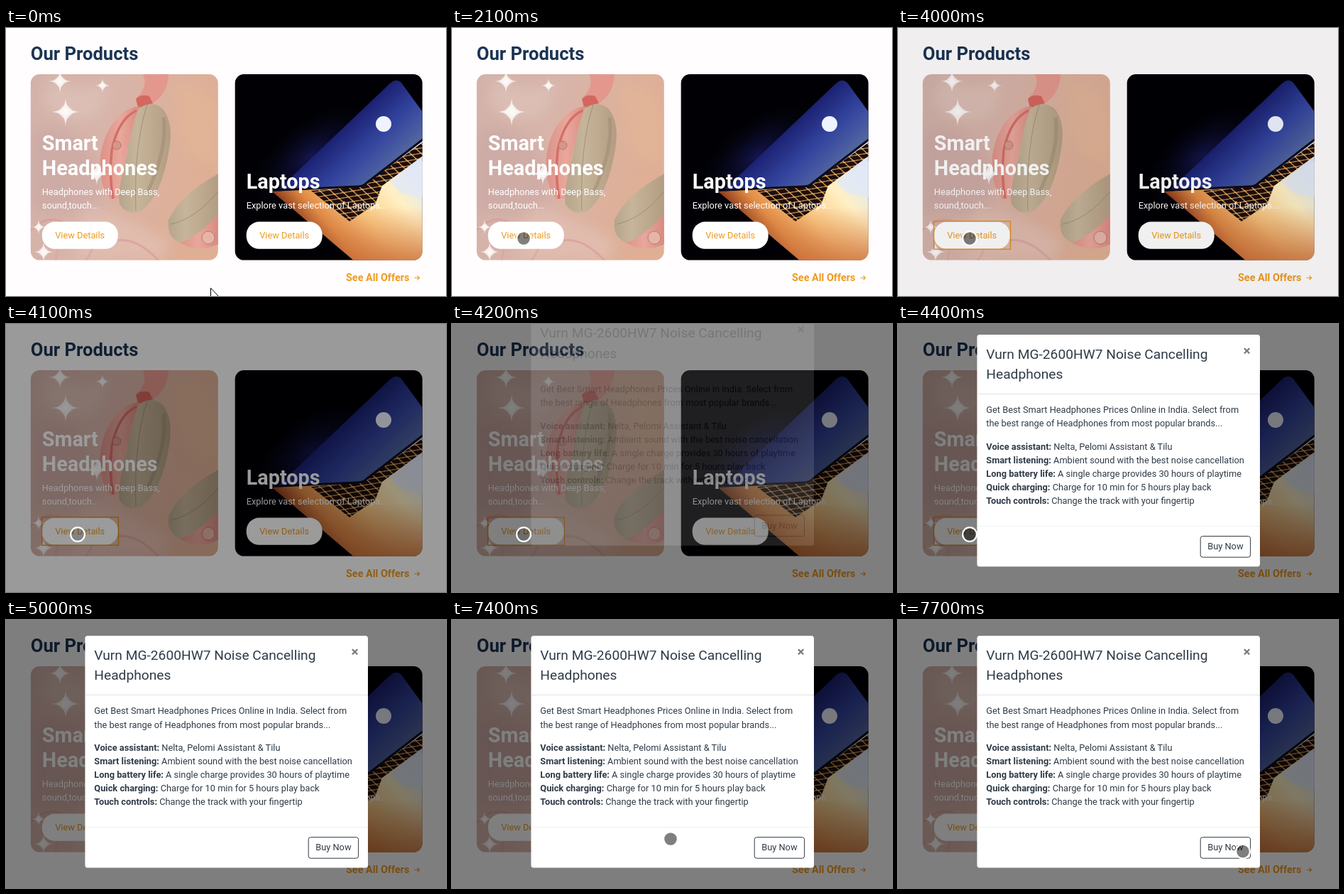
Recreate the animation shown at these times as an HTML page. Size 620x377 px, loop 8 s.

```html
<!DOCTYPE html>
<html lang="en">
<head>
<meta charset="utf-8">
<title>Our Products</title>
<style>
  html, body { margin: 0; width: 100%; height: 100%; overflow: hidden; background: #fffdfe; }
  svg { display: block; width: 620px; height: 377px; }
  text { font: 12.8px Roboto, Arial, sans-serif; fill: #2f3b48; }
  .heading { font-size: 25.6px; font-weight: 700; fill: #1b3553; }
  .name { font-size: 28.8px; font-weight: 700; fill: #fff; }
  .blurb { fill: #fff; }
  .action { fill: #ef9b20; }
  .offers { font-size: 14.4px; font-weight: 700; }
  .title { font-size: 19.2px; }
  .close { font-size: 19.2px; font-weight: 700; fill: #7a7a7a; }
  .list tspan { font-weight: 700; }
</style>
</head>
<body>
<svg viewBox="0 0 620 377">
  <defs>
    <clipPath id="leftClip"><rect x="34.8" y="65" width="264" height="261.6" rx="12.5"/></clipPath>
    <clipPath id="rightClip"><rect x="322.7" y="65" width="264" height="261.6" rx="12.5"/></clipPath>
    <filter id="soft" x="-30%" y="-30%" width="160%" height="160%"><feGaussianBlur stdDeviation="9"/></filter>
    <linearGradient id="rose" x1="0" y1="0" x2="1" y2=".25">
      <stop offset="0" stop-color="#d2b2aa"/><stop offset=".45" stop-color="#d8b4a9"/><stop offset="1" stop-color="#dfaf95"/>
    </linearGradient>
    <linearGradient id="pad" x1="0" y1="0" x2="1" y2="0">
      <stop offset="0" stop-color="#b5a58c"/><stop offset=".35" stop-color="#c6b59a"/><stop offset="1" stop-color="#b39d82"/>
    </linearGradient>
    <linearGradient id="shell" x1="0" y1="0" x2="1" y2="0">
      <stop offset="0" stop-color="#dc9289"/><stop offset=".5" stop-color="#e9a79c"/><stop offset="1" stop-color="#d98a80"/>
    </linearGradient>
    <linearGradient id="lid" gradientUnits="userSpaceOnUse" x1="440" y1="125" x2="525" y2="215">
      <stop offset="0" stop-color="#070a2c"/><stop offset=".3" stop-color="#1c2374"/>
      <stop offset=".65" stop-color="#34459f"/><stop offset="1" stop-color="#5568a0"/>
    </linearGradient>
    <linearGradient id="base" gradientUnits="userSpaceOnUse" x1="570" y1="195" x2="440" y2="312">
      <stop offset="0" stop-color="#e0e6f3"/><stop offset=".25" stop-color="#fff0c4"/>
      <stop offset=".55" stop-color="#fbcb84"/><stop offset=".8" stop-color="#e08a44"/><stop offset="1" stop-color="#7a2a14"/>
    </linearGradient>
    <linearGradient id="warm" x1="0" y1="0" x2="0" y2="1">
      <stop offset=".55" stop-color="#d9824a" stop-opacity="0"/><stop offset="1" stop-color="#c9703c" stop-opacity=".8"/>
    </linearGradient>
    <radialGradient id="night">
      <stop offset="0" stop-color="#1b1c66" stop-opacity=".75"/><stop offset="1" stop-color="#0a0a2a" stop-opacity="0"/>
    </radialGradient>
    <radialGradient id="glow">
      <stop offset="0" stop-color="#fff" stop-opacity=".8"/><stop offset="1" stop-color="#fff" stop-opacity="0"/>
    </radialGradient>
    <pattern id="keys" width="13" height="10" patternUnits="userSpaceOnUse" patternTransform="matrix(1 -.17 .68 .62 430 232)">
      <rect width="13" height="10" fill="#e0a35c"/><rect x=".8" y=".8" width="11.4" height="8.4" rx="1.4" fill="#1c0e0c"/>
    </pattern>
    <g id="spark">
      <circle r="11" fill="url(#glow)"/>
      <path d="M0-20Q.6-.6 20 0Q.6.6 0 20Q-.6.6-20 0Q-.6-.6 0-20Z" fill="#fff" opacity=".75"/>
    </g>
  </defs>

  <rect width="620" height="377" fill="#fffdfe"/>
  <text class="heading" x="34.8" y="45.2">Our Products</text>

  <g clip-path="url(#leftClip)">
    <rect x="34" y="65" width="266" height="262" fill="url(#rose)"/>
    <g filter="url(#soft)">
      <path d="M34 145Q80 130 112 165T130 260H34Z" fill="#c9a6a2" opacity=".55"/>
      <path d="M60 70Q105 95 150 75L130 125Q85 140 50 105Z" fill="#e0c6bd" opacity=".55"/>
      <path d="M110 250Q170 265 230 300L220 327H95Z" fill="#e3c0b6" opacity=".7"/>
      <path d="M235 75Q290 80 299 130V190Q245 190 240 130Z" fill="#e3b597" opacity=".7"/>
    </g>
    <path d="M34 285Q65 255 92 282T150 300T215 327" fill="none" stroke="#d79a96" stroke-width="3" opacity=".6"/>
    <path d="M70 327Q75 282 105 290T112 327" fill="none" stroke="#dfa29b" stroke-width="3" opacity=".6"/>
    <path d="M193 65Q201 82 184 98L186 112L207 106Q228 92 229 65Z" fill="#e4988d"/>
    <path d="M183 100Q190 92 202 96L207 106Q192 108 187 116Z" fill="#d4675f"/>
    <path d="M187 110C158 114 138 145 133 180Q130 220 147 241L162 239Q165 170 190 112Z" fill="url(#shell)"/>
    <path d="M184 116Q158 128 149 172Q145 208 151 240" fill="none" stroke="#d46f67" stroke-width="3.5"/>
    <path d="M187 113Q207 100 222 115Q236 135 230 170Q220 235 190 258Q170 264 160 248Q156 232 170 180Q176 140 187 113Z" fill="url(#pad)"/>
    <path d="M199 108Q180 165 183 257" fill="none" stroke="#887a63" stroke-width="1" opacity=".6"/>
    <path d="M222 126Q228 170 199 232" fill="none" stroke="#94826a" stroke-width="5" opacity=".4"/>
    <circle cx="156" cy="165" r="6" fill="#d3988a" stroke="#b4695f" stroke-width=".8"/>
    <path d="M243 301Q262 290 299 258V304Q270 318 243 301Z" fill="url(#shell)"/>
    <path d="M229 270Q245 235 299 205V262Q275 290 246 302Q226 295 229 270Z" fill="url(#pad)"/>
    <path d="M232 276Q268 268 299 230" fill="none" stroke="#887a63" opacity=".6"/>
    <circle cx="285" cy="295" r="9" fill="#e6b5aa" stroke="#c27a70"/>
    <use href="#spark" transform="translate(84 118)"/>
    <use href="#spark" transform="translate(76 75) scale(.8)"/>
    <use href="#spark" transform="translate(136 81) scale(.5)"/>
    <use href="#spark" transform="translate(128 205) scale(.8)"/>
    <use href="#spark" transform="translate(53 315) scale(.7)"/>
    <use href="#spark" transform="translate(46 280) scale(.5)"/>
  </g>
  <text class="name" x="50.8" y="172">Smart</text>
  <text class="name" x="50.8" y="206.7">Headphones</text>
  <text class="blurb" x="50.8" y="235">Headphones with Deep Bass,</text>
  <text class="blurb" x="50.8" y="254.2">sound,touch...</text>

  <g clip-path="url(#rightClip)">
    <rect x="322" y="65" width="266" height="262" fill="#010105"/>
    <ellipse cx="430" cy="180" rx="95" ry="48" transform="rotate(-38 430 180)" fill="url(#night)"/>
    <path id="deck" d="M375 230L504 222L587 158V327H490Z" fill="url(#base)"/>
    <path d="M375 230L504 222L587 158V327H490Z" fill="url(#warm)"/>
    <path d="M430 229L503 222L587 161V180L530 222L520 248L484 272Z" fill="url(#keys)"/>
    <path d="M541 216L587 187V238L558 233Z" fill="#e3eaf8" opacity=".8"/>
    <path d="M384 227L541 78Q550 70 557 77L587 118V156L507 218Q502 222 495 222Z" fill="url(#lid)"/>
    <path d="M384 228L495 223Q503 223 508 218L587 157" fill="none" stroke="#0b0b18" stroke-width="3"/>
    <circle cx="532" cy="135" r="11" fill="#eef3ff"/>
  </g>
  <text class="name" x="338.7" y="226">Laptops</text>
  <text class="blurb" x="338.7" y="254.2">Explore vast selection of Laptops...</text>

  <g fill="#fff">
    <rect x="50.8" y="272.6" width="107" height="38.2" rx="18"/>
    <rect x="338.7" y="272.6" width="107" height="38.2" rx="18"/>
  </g>
  <text class="action" x="69.2" y="296.4">View Details</text>
  <text class="action" x="357.2" y="296.4">View Details</text>
  <rect id="focus" x="50.5" y="271.8" width="108" height="39.4" fill="none" stroke="#e08a1c" stroke-width="1.3"/>

  <text class="action offers" x="479" y="356">See All Offers</text>
  <path d="M575.5 351.5H582.5M579.5 348.5L582.5 351.5L579.5 354.5" fill="none" stroke="#ef9b20" stroke-width="1.1"/>

  <rect id="shade" width="620" height="377"/>

  <g id="modal">
    <rect x="111.4" y="22.2" width="398.6" height="326.2" rx="3.5" fill="#fff"/>
    <path d="M111.4 105.5H510" stroke="#dee2e6"/>
    <path d="M111.4 291.5H510" stroke="#eef0f2"/>
    <text class="title" x="124.3" y="56">Vurn MG-2600HW7 Noise Cancelling</text>
    <text class="title" x="124.3" y="84.4">Headphones</text>
    <text class="close" x="491.5" y="51" text-anchor="middle">×</text>
    <text x="124.3" y="132.2">Get Best Smart Headphones Prices Online in India. Select from</text>
    <text x="124.3" y="151.6">the best range of Headphones from most popular brands...</text>
    <g class="list">
      <text x="124.3" y="184.4"><tspan>Voice assistant:</tspan> Nelta, Pelomi Assistant &amp; Tilu</text>
      <text x="124.3" y="203.4"><tspan>Smart listening:</tspan> Ambient sound with the best noise cancellation</text>
      <text x="124.3" y="222.4"><tspan>Long battery life:</tspan> A single charge provides 30 hours of playtime</text>
      <text x="124.3" y="241.4"><tspan>Quick charging:</tspan> Charge for 10 min for 5 hours play back</text>
      <text x="124.3" y="260.4"><tspan>Touch controls:</tspan> Change the track with your fingertip</text>
    </g>
    <rect x="426.2" y="305.6" width="70.4" height="29.6" rx="3.2" fill="#fff" stroke="#343a40"/>
    <text x="461.4" y="324.4" text-anchor="middle">Buy Now</text>
  </g>

  <path id="arrow" d="M288.5 365.8V382L292.5 378.5H300.5Z" fill="#fff" stroke="#000"/>
  <circle id="pointer" r="9.9" stroke="#fff" stroke-width="2.2"/>
</svg>
<script>
  const LOOP = 8000, STEP = 100;
  const [focusBox, shade, modal, arrow, pointer] =
    ['focus', 'shade', 'modal', 'arrow', 'pointer'].map(id => document.getElementById(id));

  // Pointer keys: time, x, y, visible
  const path = [
    [0, 290, 368, 0], [100, 290, 368, 1], [1800, 290, 368, 1],
    [2000, 135, 309, 1], [2100, 101, 296, 1], [4800, 101, 296, 1],
    [4900, 573, 346, 1], [5000, 620, 377, 0],
    [7400, 308, 308, 1], [7600, 456, 322, 1], [7700, 486, 325.5, 1], [LOOP, 486, 325.5, 1]
  ];

  const clamp = v => Math.min(1, Math.max(0, v));
  const show = (el, on) => el.setAttribute('visibility', on ? 'visible' : 'hidden');

  function pointerAt(t) {
    const i = path.findLastIndex(k => k[0] <= t);
    const a = path[i], b = path[i + 1] || a;
    const p = b === a ? 0 : (t - a[0]) / (b[0] - a[0]);
    return { x: a[1] + (b[1] - a[1]) * p, y: a[2] + (b[2] - a[2]) * p, on: a[3] };
  }

  function draw(t) {
    const { x, y, on } = pointerAt(t);
    show(arrow, t < 100);
    show(pointer, on);
    pointer.setAttribute('cx', x);
    pointer.setAttribute('cy', y);
    pointer.setAttribute('fill-opacity', t >= 4100 && t < 4300 ? .15 : .5);

    show(focusBox, t >= 4000 && t < 4600);
    shade.setAttribute('opacity', Math.min(.5, clamp((t - 3982) / 300)));

    // Dialog fades in while sliding down with an ease-out
    const left = 1 - clamp((t - 4182) / 330);
    modal.setAttribute('opacity', clamp((t - 4182) / 150));
    modal.setAttribute('transform', `translate(0 ${-40 * left ** 1.6})`);
  }

  const start = performance.now();
  function frame() {
    const t = (performance.now() - start) % LOOP;
    draw(Math.floor(t / STEP) * STEP);
    requestAnimationFrame(frame);
  }
  frame();
</script>
</body>
</html>
```
